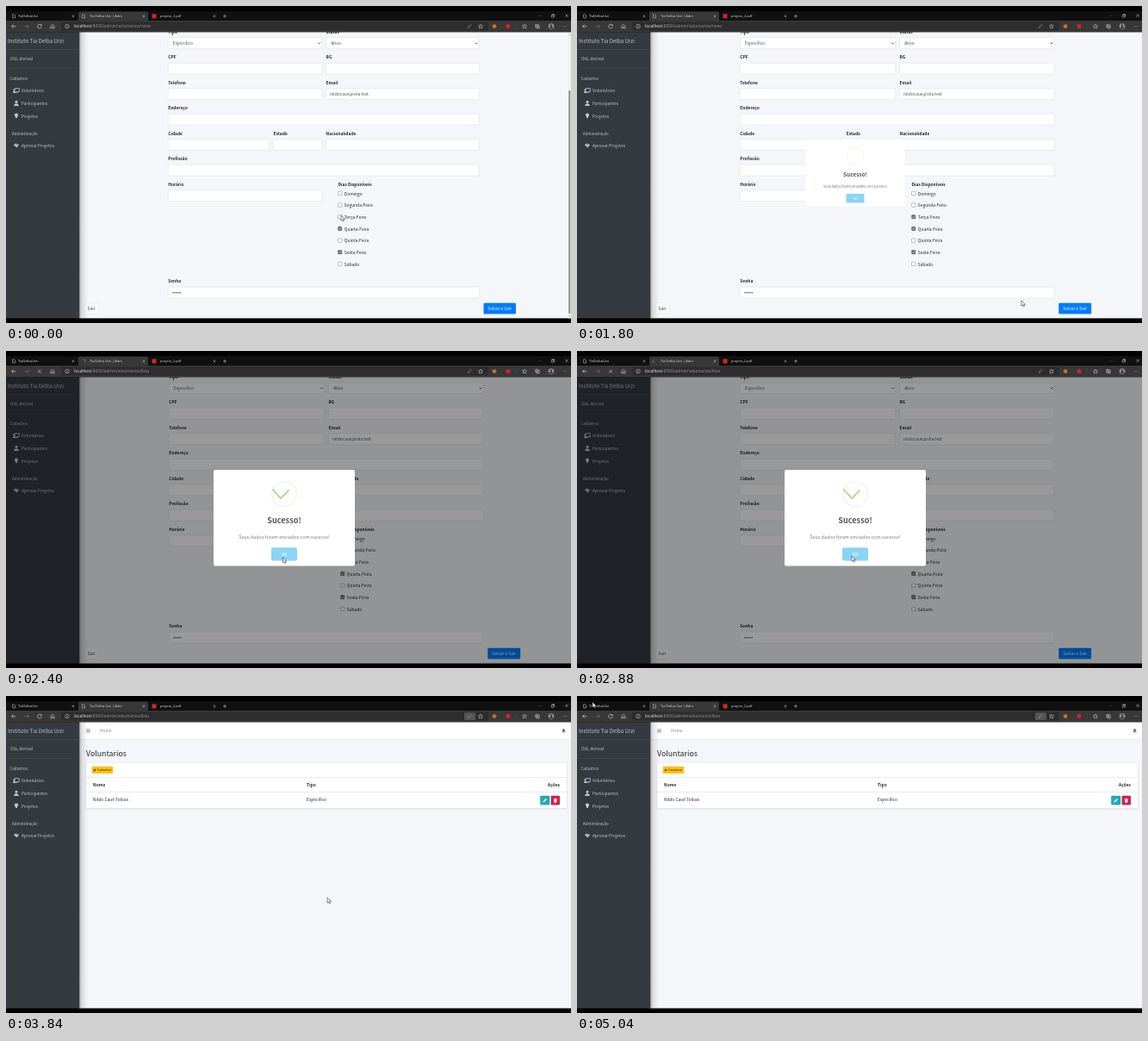
Recreate the animation shown at these times as an HTML page with a canvas. Size 656 px wide and 368 px high, loop 5280 ms.

```html
<!DOCTYPE html>
<html lang="pt">
<head>
<meta charset="utf-8">
<title>Voluntarios</title>
<style>
html, body { margin: 0; width: 100%; height: 100%; overflow: hidden; background: #000; }
canvas { display: block; width: 656px; height: 368px; }
</style>
</head>
<body>
<canvas id="stage"></canvas>
<script>
const LOOP = 5280, STEP = 120;
const MODAL = 1800, PAGE = 3000, LOADED = 3240;
const WEB = '"Noto Sans CJK JP", "Noto Sans CJK SC", "Noto Sans CJK", sans-serif';
const UI = '"Open Sans", "Noto Sans", sans-serif';

const canvas = document.getElementById('stage');
const dpr = window.devicePixelRatio || 1;
canvas.width = 656 * dpr;
canvas.height = 368 * dpr;
const ctx = canvas.getContext('2d');

const clamp = v => Math.max(0, Math.min(1, v));
const mix = (a, b, k) => a + (b - a) * k;

function box(x, y, w, h, fill, radius = 0, stroke) {
  ctx.beginPath();
  ctx.roundRect(x, y, w, h, radius);
  if (fill) { ctx.fillStyle = fill; ctx.fill(); }
  if (stroke) { ctx.strokeStyle = stroke; ctx.lineWidth = 0.4; ctx.stroke(); }
}

function disc(x, y, r, color) {
  box(x - r, y - r, 2 * r, 2 * r, color, r);
}

// Path relative to (x, y); a width of 0 fills it
function path(d, x, y, color, width = 0.6) {
  ctx.save();
  ctx.translate(x, y);
  const shape = new Path2D(d);
  ctx.strokeStyle = ctx.fillStyle = color;
  ctx.lineWidth = width;
  if (width) ctx.stroke(shape); else ctx.fill(shape);
  ctx.restore();
}

// y is the middle of the capitals; drawn large and scaled down for exact spacing
function text(str, x, y, { size = 5.47, color = '#212529', weight = 400, align = 'left', font = WEB } = {}) {
  const em = font === WEB ? size / 1.117 : size;
  ctx.save();
  ctx.translate(x, y + em * 0.365);
  ctx.scale(0.1, 0.1);
  ctx.font = `${weight} ${em * 10}px ${font}`;
  ctx.textAlign = align;
  ctx.fillStyle = color;
  ctx.fillText(str, 0, 0);
  const width = ctx.measureText(str).width / 10;
  ctx.restore();
  return width;
}

const cross = (x, y, r, color, width) => path(`M${-r} ${-r}L${r} ${r}M${r} ${-r}L${-r} ${r}`, x, y, color, width);
const bold = { weight: 700 };

const cursorPath = [
  [0, 389, 243], [480, 389, 243], [840, 572, 349], [1560, 572, 349], [1680, 552, 348],
  [1800, 516, 342], [1920, 464, 326], [2280, 322, 240], [2880, 319, 238], [3720, 319, 238],
  [4200, 535, 222], [4320, 527, 198], [4440, 217, 104], [4680, 95, 58], [5040, 18, 7]
];

function drawCursor(t) {
  let i = 1;
  while (i < cursorPath.length - 1 && cursorPath[i][0] < t) i++;
  const [t0, x0, y0] = cursorPath[i - 1], [t1, x1, y1] = cursorPath[i];
  const k = clamp((t - t0) / (t1 - t0));
  const x = mix(x0, x1, k), y = mix(y0, y1, k);
  const arrow = 'M0 0V6.2L1.5 4.9L2.5 7L3.5 6.5L2.6 4.5H4.4Z';
  path(arrow, x, y, '#fff', 0);
  path(arrow, x, y, '#111', 0.5);
}

function drawChrome(t) {
  const loading = t >= 1920 && t < LOADED + STEP;
  const light = '#ddd', dim = '#999';
  const label = { size: 3.9, color: '#ddd', font: UI };
  box(0, 0, 656, 30.3, '#000');
  box(0, 6, 656, 12, '#101010');
  box(84, 6.5, 81, 13, '#383838', 2);
  box(0, 17, 656, 13.3, '#383838');
  box(64, 18.6, 496, 10, '#2d2d2d', 1.5);

  const sheet = 'M-1.4 -2H.5L1.5 -1V2H-1.4Z';
  path(sheet, 9, 11.8, light, 0.5);
  text('TiaDelbaUrzi', 14, 11.8, label);
  if (loading) {
    const a = t / 140;
    ctx.beginPath();
    ctx.arc(90, 11.8, 2, a, a + 2.4);
    ctx.strokeStyle = '#9ab';
    ctx.lineWidth = 0.6;
    ctx.stroke();
  } else path(sheet, 90, 11.8, light, 0.5);
  text('Tia Delba Urzi | Adm', 97, 11.8, label);
  box(169.5, 9.3, 5, 5, '#d9222a');
  text('projeto_2.pdf', 179, 11.8, label);
  [78, 160, 242].forEach(x => cross(x, 11.8, 1.3, light, 0.5));
  path('M-2 0H2M0 -2V2', 254, 11.8, light, 0.5);
  path('M-1.7 0H1.7', 620, 11.5, '#666', 0.4);
  path('M-1.7 -.8H.9V1.8H-1.7ZM-.8 -.8V-1.7H1.8V.9H.9', 635, 11.3, light, 0.5);
  cross(651, 11.2, 1.7, light, 0.5);

  path('M2.5 0H-2.5M-.3 -2.2L-2.5 0L-.3 2.2', 9, 23.6, light);
  path('M-2.5 0H2.5M.3 -2.2L2.5 0L.3 2.2', 24, 23.6, '#777');
  if (loading) cross(39, 23.6, 1.9, light, 0.6);
  else path('M1.9 -1.3A2.3 2.3 0 1 0 2.3 .3M2.2 -2.4V-.9H.7', 39, 23.6, light);
  path('M-2.2 2.3V-.4L0 -2.4L2.2 -.4V2.3H.7V.4H-.7V2.3Z', 54, 23.6, light, 0.5);
  path('M2.3 0A2.3 2.3 0 1 1 -2.3 0A2.3 2.3 0 1 1 2.3 0M0 -.4V1.3M0 -1.3V-.8', 71, 23.6, light, 0.5);

  const url = { size: 4.85, color: '#eee', font: UI };
  const host = text('localhost', 79, 23.6, url);
  text(':8000/admin/voluntarios/' + (t < 2400 ? 'novo' : 'lista'), 79 + host, 23.6, { ...url, color: '#999' });

  if (t >= LOADED) box(532, 19.3, 13, 8.6, '#555', 1);
  path('M-2 2L-1.5 .5L1.2 -2.2L2.2 -1.2L-.5 1.5Z', 538, 23.6, dim, 0.5);
  const star = 'M0 -2.5L.8 -.8L2.5 -.7L1.2 .5L1.6 2.3L0 1.3L-1.6 2.3L-1.2 .5L-2.5 -.7L-.8 -.8Z';
  path(star, 551, 23.6, light, 0.5);
  disc(567, 23.6, 2.4, '#c8702c');
  disc(583, 23.6, 2.5, '#d8222c');
  path('M0 -3V3', 592, 23.6, '#555', 0.4);
  path(star, 602, 23.6, light, 0.5);
  path('M-2.3 -2.2H1V1H-2.3ZM1 -1H2.3V2.3H-1V1M-.7 -1.4V.4M-1.6 -.5H.2', 617, 23.6, light, 0.5);
  disc(633, 23.6, 3.3, '#8d8d8d');
  disc(633, 22.6, 1.1, '#292929');
  path('M-2 2.5Q-1.8 .4 0 .4Q1.8 .4 2 2.5Z', 633, 23.6, '#292929', 0);
  [-1.8, 0, 1.8].forEach(d => disc(649 + d, 23.6, 0.4, light));
}

function drawSidebar(icons) {
  const color = '#c2c7d0';
  const shade = ctx.createLinearGradient(85, 0, 95, 0);
  shade.addColorStop(0, 'rgba(0,0,0,.28)');
  shade.addColorStop(0.35, 'rgba(0,0,0,.1)');
  shade.addColorStop(1, 'rgba(0,0,0,0)');
  box(85, 30, 10, 332.5, shade);
  box(0, 30, 85.3, 332.5, '#343a40');
  box(0, 50, 85.3, 0.4, '#4b545c');
  box(3, 72.2, 79.5, 0.4, '#59616a');
  text('Instituto Tia Delba Urzi', 2, 40.4, { size: 6.83, color, weight: 300 });
  text('Olá, dorival', 5, 61.6, { color });
  text('Cadastros', 4.5, 84.8, { size: 4.92, color });
  text('Administração', 7, 148.5, { size: 4.92, color });
  text('Voluntários', 18, 98.4, { color });
  text('Participantes', 18, 113.1, { color });
  text('Projetos', 18, 127.9, { color });
  text('Aprovar Projetos', 18, 162, { color });
  if (!icons) return;
  path('M-2.2 -2.4H3.3V1.6H0M-1 2.4H1.6', 12, 98, color, 0.8);
  disc(9.6, 97.4, 1.2, color);
  path('M-4 3Q-4 .8 -2.4 .8Q-.6 .8 -.6 3Z', 12, 98, color, 0);
  disc(12, 111.3, 1.5, color);
  path('M-2.7 2.9Q-2.7 .2 0 .2Q2.7 .2 2.7 2.9Z', 12, 113, color, 0);
  disc(12, 126.6, 2.1, color);
  path('M-1.3 .4H1.3L.8 2.9H-.8Z', 12, 127.2, color, 0);
  path('M-3.2 -.3L-.8 -2.4L3.1 -.9L.7 2.5Z', 12, 161.8, color, 0);
  path('M-1.4 .2L.2 -1.2L1.8 .4', 12, 161.8, '#343a40', 0.5);
}

function drawForm(t) {
  // Losing the scrollbar widens the page
  const wide = t >= MODAL ? 1.0102 : 1;
  const fx = x => 85.4 + (x - 85.4) * wide;
  const grey = '#495057';
  const label = (s, x, y) => text(s, fx(x), y, bold);
  const input = (x0, x1, y) => box(fx(x0), y - 6.4, fx(x1) - fx(x0), 12.8, '#fff', 1.3, '#ced4da');
  const L = 188.2, M = 371.6, R = 549.5, LE = 366.8;

  box(85, 30, 571, 332.5, '#f4f6f9');
  label('Tipo', L, 30);
  label('Status', M, 30);
  [[L, LE, 'Especifico'], [M, R, 'Ativo']].forEach(([x0, x1, value]) => {
    input(x0, x1, 43.2);
    text(value, fx(x0 + 5.6), 43.2, { color: grey });
    path('M-1.5 -.8L0 .8L1.5 -.8', fx(x1) - 3.2, 43.2, '#333', 0.7);
  });
  [
    ['CPF', L, LE, 59.3], ['RG', M, R, 59.3],
    ['Telefone', L, LE, 88.8], ['Email', M, R, 88.8],
    ['Endereço', L, R, 118.2],
    ['Cidade', L, 306, 147.8], ['Estado', 310.5, LE, 147.8], ['Nacionalidade', M, R, 147.8],
    ['Profissão', L, R, 177.2], ['Horário', L, LE, 206.8], ['Senha', L, R, 319.2]
  ].forEach(([name, x0, x1, y]) => {
    label(name, x0, y);
    input(x0, x1, y + 13.4);
  });
  text('nildocaue@vila.test', fx(M + 4.4), 102.2, { color: grey });
  for (let i = 0; i < 5; i++) disc(fx(193.8) + i * 2.1, 332.8, 0.8, grey);

  label('Dias Disponíveis', 385.5, 206.8);
  ['Domingo', 'Segunda-Feira', 'Terça-Feira', 'Quarta-Feira', 'Quinta-Feira', 'Sexta-Feira', 'Sábado'].forEach((day, i) => {
    const x = fx(385.5), y = 217.9 + i * 13.66;
    const checked = i === 3 || i === 5 || (i === 2 && t >= 240);
    box(x, y - 2.6, 4.4, 4.4, checked ? '#666' : '#fff', 0.6, '#666');
    if (checked) path('M.9 -.4L1.9 .6L3.6 -1.5', x, y, '#fff', 0.7);
    text(day, x + 7.3, y);
  });

  box(91, 344.7, 16.5, 12.8, '#f8f9fa', 1.3, '#ddd');
  text('Sair', 94.5, 351.2, { color: '#444' });
  box(fx(554.5), 344.7, 37.5 * wide, 12.8, t >= 840 && t < 1680 ? '#0069d9' : '#007bff', 1.3);
  text('Salvar e Sair', fx(573.2), 351.2, { color: '#fff', align: 'center' });
  if (t < MODAL) {
    box(652.6, 30, 3.4, 332.5, '#f1f1f1');
    box(653.3, 98, 2, 259, '#8b8b8b', 0.5);
    path('M-1 .6L0 -.6L1 .6Z', 654.3, 33, '#777', 0);
    path('M-1 -.6L0 .6L1 -.6Z', 654.3, 360, '#777', 0);
  }
}

function drawModal(t) {
  const scale = t < MODAL + STEP ? 0.7 : 1;
  ctx.save();
  ctx.translate(323, 193.8);
  ctx.scale(scale, scale);
  box(-82, -55.8, 164, 111.5, '#fff', 1.7);
  ctx.beginPath();
  ctx.arc(0, -27.8, 14.4, 0, 7);
  ctx.strokeStyle = 'rgba(165,220,134,.22)';
  ctx.lineWidth = 1.37;
  ctx.stroke();

  const tip = clamp((t - 2040) / 200), arm = clamp((t - 2200) / 160);
  if (tip > 0) {
    let d = `M-13.6 -33.4L${mix(-13.6, -4, tip)} ${mix(-33.4, -22.6, tip)}`;
    if (arm > 0) d += `L${mix(-4, 5.6, arm)} ${mix(-22.6, -32.4, arm)}`;
    path(d, 0, 0, '#a5dc86', 1.7);
  }
  text('Sucesso!', 0, 3, { size: 10.25, color: '#575757', weight: 700, align: 'center' });
  text('Seus dados foram enviados com sucesso!', 0, 22, { size: 6.15, color: '#797979', weight: 300, align: 'center' });
  box(-15, 34.4, 30, 15.2, '#8cd4f5', 1.7);
  text('OK', 0, 42.4, { size: 5.8, color: '#fff', align: 'center' });
  ctx.restore();
}

function drawList(t) {
  const ready = t >= LOADED;
  const typeX = ready ? 349 : 352.3;
  box(85, 30, 571, 332.5, '#f4f6f9');
  box(85, 30, 571, 20, '#fff');
  box(85, 50, 571, 0.4, '#dee2e6');
  text('Home', 109, 40.4, { color: '#858585' });
  text('Voluntarios', 93, 66.6, { size: 9.84 });

  ctx.save();
  ctx.shadowColor = 'rgba(0,0,0,.25)';
  ctx.shadowBlur = 1.5 * dpr;
  ctx.shadowOffsetY = 0.4 * dpr;
  box(93, 77.8, 558, 52.6, '#fff', 1.3);
  ctx.restore();
  if (t >= 4320 && t < 4560) box(93, 111.4, 558, 19, '#ececec');
  box(93, 94.6, 558, 0.4, '#d5d9dd');
  box(93, 111, 558, 0.6, '#d5d9dd');

  box(99.7, 81.8, 24.5, 8.3, '#ffc107', 0.9);
  text('Cadastrar', 105.8, 86, { size: 4.1 });
  text('Nome', 101, 103, bold);
  text('Tipo', typeX, 103, bold);
  text('Ações', 643, 103, { weight: 700, align: 'right' });
  text('Nildo Cauê Tobias', 101, 120.2);
  text('Especifico', typeX, 120.2);
  box(ready ? 620.2 : 621.6, 115.8, ready ? 11 : 10, 10.7, '#20abb2', 0.9);
  box(632.6, 115.8, 10.4, 10.7, '#d0214a', 0.9);

  if (ready) {
    path('M-1.5 0H1.5M0 -1.5V1.5', 103, 86, '#222', 0.7);
    path('M-2.2 2.2L-1.8 .7L1 -2.1L2.1 -1L-.7 1.8Z', 625.7, 121.2, '#fff', 0);
    path('M-2 -2.3H-.7L-.4 -2.7H.4L.7 -2.3H2V-1.6H-2ZM-1.7 -1.2H1.7L1.4 2.6H-1.4Z', 637.8, 121.2, '#fff', 0);
    path('M-2.4 -1.6H2.4M-2.4 0H2.4M-2.4 1.6H2.4', 95.5, 40.4, '#777', 0.7);
    path('M-2.3 1.5Q-1.5 .8 -1.5 -.6Q-1.5 -2.1 0 -2.5Q1.5 -2.1 1.5 -.6Q1.5 .8 2.3 1.5ZM-.7 1.9H.7L0 2.7Z', 647.5, 40.2, '#777', 0);
  }
  if (t < 3720) {
    box(85, 343, 571, 19.5, '#fff');
    box(85, 343, 571, 0.4, '#dee2e6');
  }
}

function draw(t) {
  ctx.setTransform(dpr, 0, 0, dpr, 0, 0);
  box(0, 0, 656, 368, '#000');
  if (t < PAGE) drawForm(t); else drawList(t);
  drawSidebar(t < PAGE || t >= LOADED);
  if (t >= MODAL && t < PAGE) {
    if (t >= MODAL + STEP) box(0, 30, 656, 332.5, 'rgba(0,0,0,.4)');
    drawModal(t);
  }
  drawChrome(t);
  drawCursor(t);
}

function tick() {
  const now = performance.now() % LOOP;
  draw(Math.min(Math.floor(now / STEP) * STEP, LOOP - 2 * STEP));
  requestAnimationFrame(tick);
}
tick();
</script>
</body>
</html>
```
